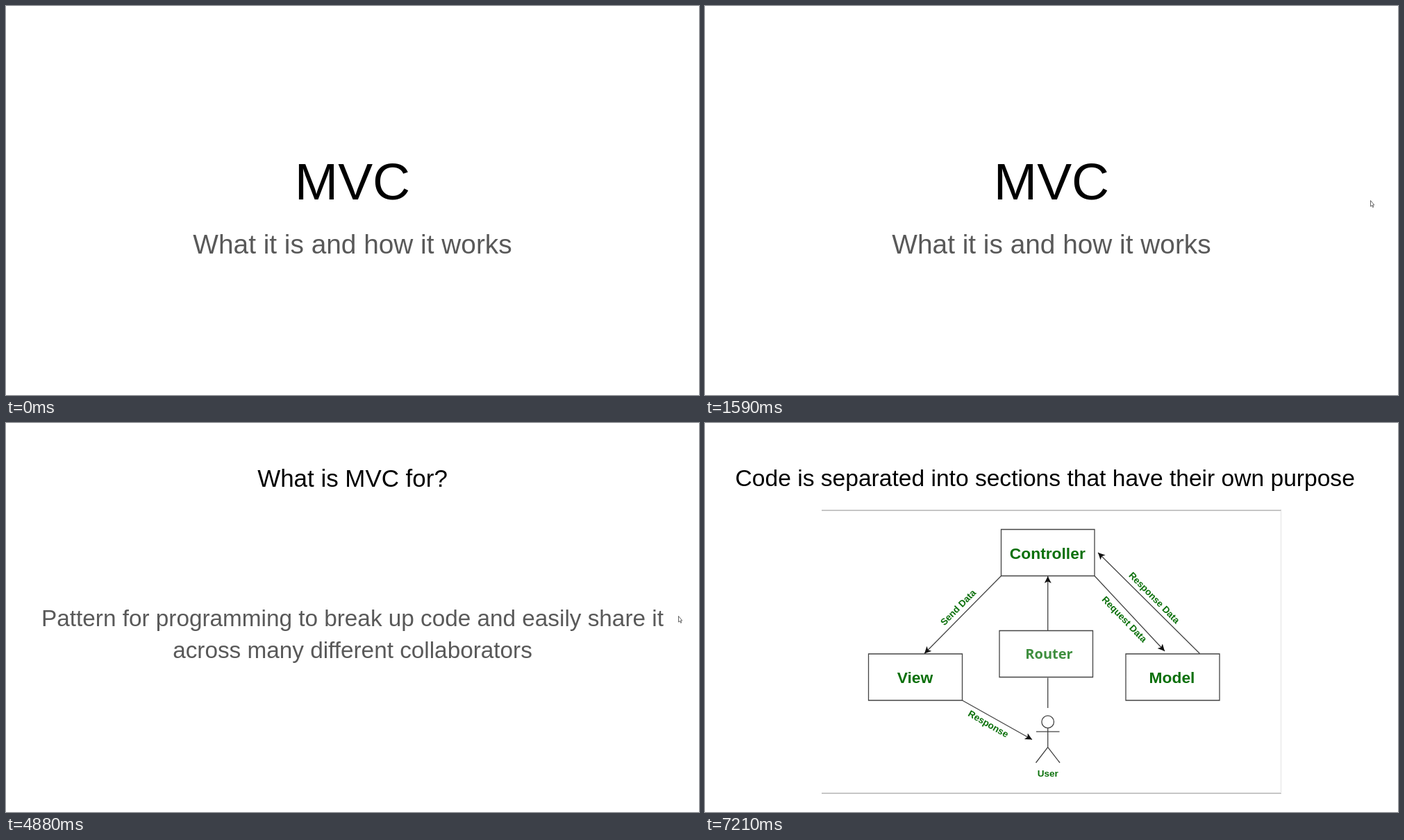
Write an HTML page that moves like this. It is 998 px wide and 561 px high and loops after 8 s.

```html
<!DOCTYPE html>
<html lang="en">
<head>
<meta charset="utf-8">
<title>MVC slides</title>
<style>
  html, body { margin: 0; width: 100%; height: 100%; overflow: hidden; background: #fff; }
  svg { display: block; width: 998px; height: 561px; }
  text { font-family: "Liberation Sans", Arial, sans-serif; text-anchor: middle; }
  .body { fill: #595959; }
  .name { font-size: 22.8px; }
  .label { font-size: 13.5px; }
  .green text { font-weight: 700; fill: #0b700b; }
  .green .router { font-family: "Open Sans", sans-serif; font-size: 20px; fill: #3f8f3f; }
  .lines { fill: none; stroke: #444; stroke-width: 1.3; }
  .slide, #cursor { visibility: hidden; }
</style>
</head>
<body>
<svg viewBox="0 0 998 561">
  <defs>
    <marker id="head" markerUnits="userSpaceOnUse" markerWidth="12" markerHeight="12" refX="10" refY="5" orient="auto">
      <path d="M0 0L10 5L0 10L2.5 5z" fill="#111"/>
    </marker>
  </defs>

  <g class="slide">
    <text x="499" y="279" font-size="74.85">MVC</text>
    <text class="body" x="499" y="357" font-size="38.8">What it is and how it works</text>
  </g>

  <g class="slide">
    <text x="499" y="92" font-size="34.93">What is MVC?</text>
    <g class="body" font-size="39">
      <text x="499" y="173.5">Model</text>
      <text x="499" y="313.5">View</text>
      <text x="499" y="453.5">Controller</text>
    </g>
  </g>

  <g class="slide">
    <text x="499" y="92" font-size="34.93">What is MVC for?</text>
    <g class="body" font-size="33.3">
      <text x="499" y="292.5">Pattern for programming to break up code and easily share it</text>
      <text x="499" y="338.5">across many different collaborators</text>
    </g>
  </g>

  <g class="slide">
    <text x="489.7" y="91" font-size="33.6">Code is separated into sections that have their own purpose</text>
    <path d="M168 126H830M168 534H830" stroke="#b4b4b4" stroke-width="1.3"/>
    <path d="M829.5 126V534" stroke="#e2e2e2"/>
    <g class="lines">
      <path d="M426.5 153.5h134.5v67h-134.5zM424 299.5h134.5v67h-134.5zM235.5 333h135v67h-135zM606 333h135v67h-135z"/>
      <g marker-end="url(#head)">
        <path d="M426.5 220.5L316 332.5"/>
        <path d="M561 220.5L662 329"/>
        <path d="M712.5 332.5L566 187"/>
        <path d="M493.7 299V221"/>
        <path d="M370.5 400L471 456.5"/>
      </g>
      <path d="M493.7 367.5V411M493.7 440V467.5M477 445.2H510.5M476.5 490L493.7 467.5L511 490"/>
      <circle cx="493.7" cy="431" r="8.8"/>
    </g>
    <g class="green">
      <text class="name" x="493.3" y="195.5">Controller</text>
      <text class="name" x="302.5" y="375">View</text>
      <text class="name" x="672.5" y="375">Model</text>
      <text class="router" x="495.5" y="340">Router</text>
      <text class="label" x="493.8" y="509.5">User</text>
      <text class="label" y="4.6" transform="translate(364.5 266) rotate(-45.5)">Send Data</text>
      <text class="label" y="4.6" transform="translate(604 283) rotate(46)">Request Data</text>
      <text class="label" y="4.6" transform="translate(647 252) rotate(45.5)">Response Data</text>
      <text class="label" y="4.6" transform="translate(408 434) rotate(30)">Response</text>
    </g>
  </g>

  <path id="cursor" d="M.5 .5V9.2L2.3 7.4L3.7 10.4L4.8 9.9L3.6 7H5.8z" fill="#fff" stroke="#555" stroke-width=".9"/>
</svg>
<script>
  const LOOP = 8000;
  const slides = document.querySelectorAll('.slide');
  const cursor = document.getElementById('cursor');
  const slideStarts = [0, 2060, 4880, 7210];
  // [time, x, y]; an entry without a place hides the cursor
  const moves = [
    [0], [1440, 971, 281], [1510, 964, 280], [1590, 958, 280],
    [1830, 960, 280], [1910, 965, 279], [1990, 968, 278], [7040]
  ];
  const show = (el, on) => { el.style.visibility = on ? 'visible' : 'hidden'; };
  const start = performance.now();

  function draw() {
    const t = (performance.now() - start) % LOOP;
    const current = slideStarts.findLastIndex(s => s <= t);
    slides.forEach((slide, i) => show(slide, i === current));
    const [, x, y] = moves.findLast(m => m[0] <= t);
    show(cursor, x !== undefined);
    if (x !== undefined) cursor.setAttribute('transform', `translate(${x} ${y})`);
    requestAnimationFrame(draw);
  }
  draw();
</script>
</body>
</html>
```
